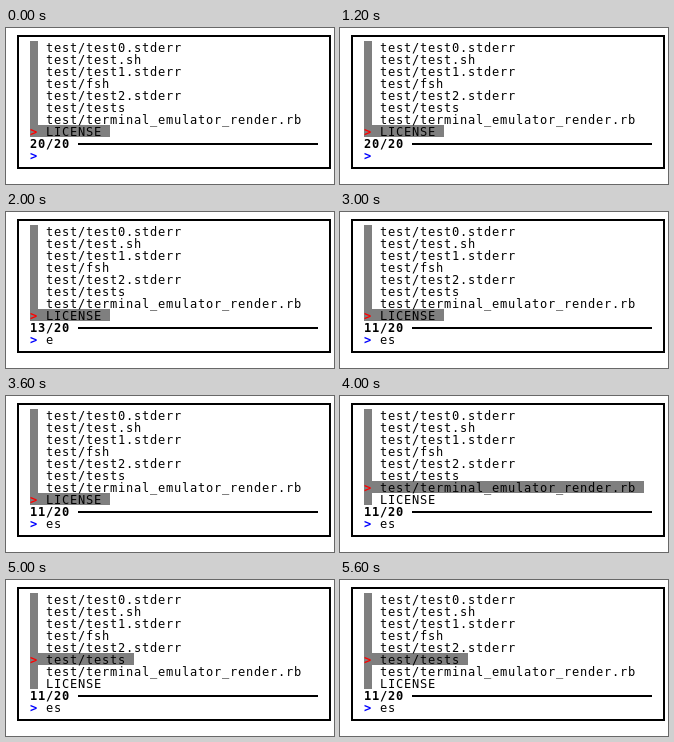
An HTML page with a canvas that plays this animation: 328 px wide and 156 px high, repeating every 6000 ms.

```html
<!DOCTYPE html>
<html lang="en">
<head>
<meta charset="utf-8">
<title>Fuzzy finder</title>
<style>
  html, body { margin: 0; width: 100%; height: 100%; overflow: hidden; background: #fff; }
  canvas { display: block; width: 328px; height: 156px; }
</style>
</head>
<body>
<canvas id="screen" width="328" height="156"></canvas>
<script>
const ctx = document.getElementById('screen').getContext('2d');
const CELL_W = 8, CELL_H = 12, LEFT = 24, TOP = 13, BASELINE = 11;
const GRAY = '#7f7f7f';
const LOOP = 6000;

const files = [
  'test/test0.stderr', 'test/test.sh', 'test/test1.stderr', 'test/fsh',
  'test/test2.stderr', 'test/tests', 'test/terminal_emulator_render.rb', 'LICENSE'
];

const steps = [
  { at: 0, count: 20, query: '', row: 7 },
  { at: 2000, count: 13, query: 'e', row: 7 },
  { at: 3000, count: 11, query: 'es', row: 7 },
  { at: 4000, count: 11, query: 'es', row: 6 },
  { at: 5000, count: 11, query: 'es', row: 5 }
];

function rect(x, y, w, h, color) {
  ctx.fillStyle = color;
  ctx.fillRect(x, y, w, h);
}

// One glyph per terminal cell
function text(str, col, row, color = '#000', bold = false) {
  ctx.font = `${bold ? 'bold ' : ''}12px "DejaVu Sans Mono", monospace`;
  ctx.fillStyle = color;
  [...str].forEach((ch, i) =>
    ctx.fillText(ch, LEFT + (col + i) * CELL_W, TOP + row * CELL_H + BASELINE));
}

function drawBorder() {
  rect(11, 7, 314, 2, '#000');
  rect(11, 139, 314, 2, '#000');
  rect(11, 7, 2, 134, '#000');
  rect(323, 7, 2, 134, '#000');
}

function draw({ count, query, row }) {
  rect(0, 0, 328, 156, '#fff');
  drawBorder();
  rect(LEFT, TOP, CELL_W, files.length * CELL_H, GRAY);
  rect(LEFT, TOP + row * CELL_H, (files[row].length + 3) * CELL_W, CELL_H, GRAY);
  files.forEach((name, i) => text(name, 2, i));
  text('>', 0, row, '#f00', true);
  text(`${count}/20`, 0, 8, '#000', true);
  rect(72, 115, 240, 2, '#000');
  text('>', 0, 9, '#00f', true);
  text(query, 2, 9);
}

const start = performance.now();

function tick() {
  const t = (performance.now() - start) % LOOP;
  draw(steps.filter(s => s.at <= t).pop());
  requestAnimationFrame(tick);
}
tick();
</script>
</body>
</html>
```
